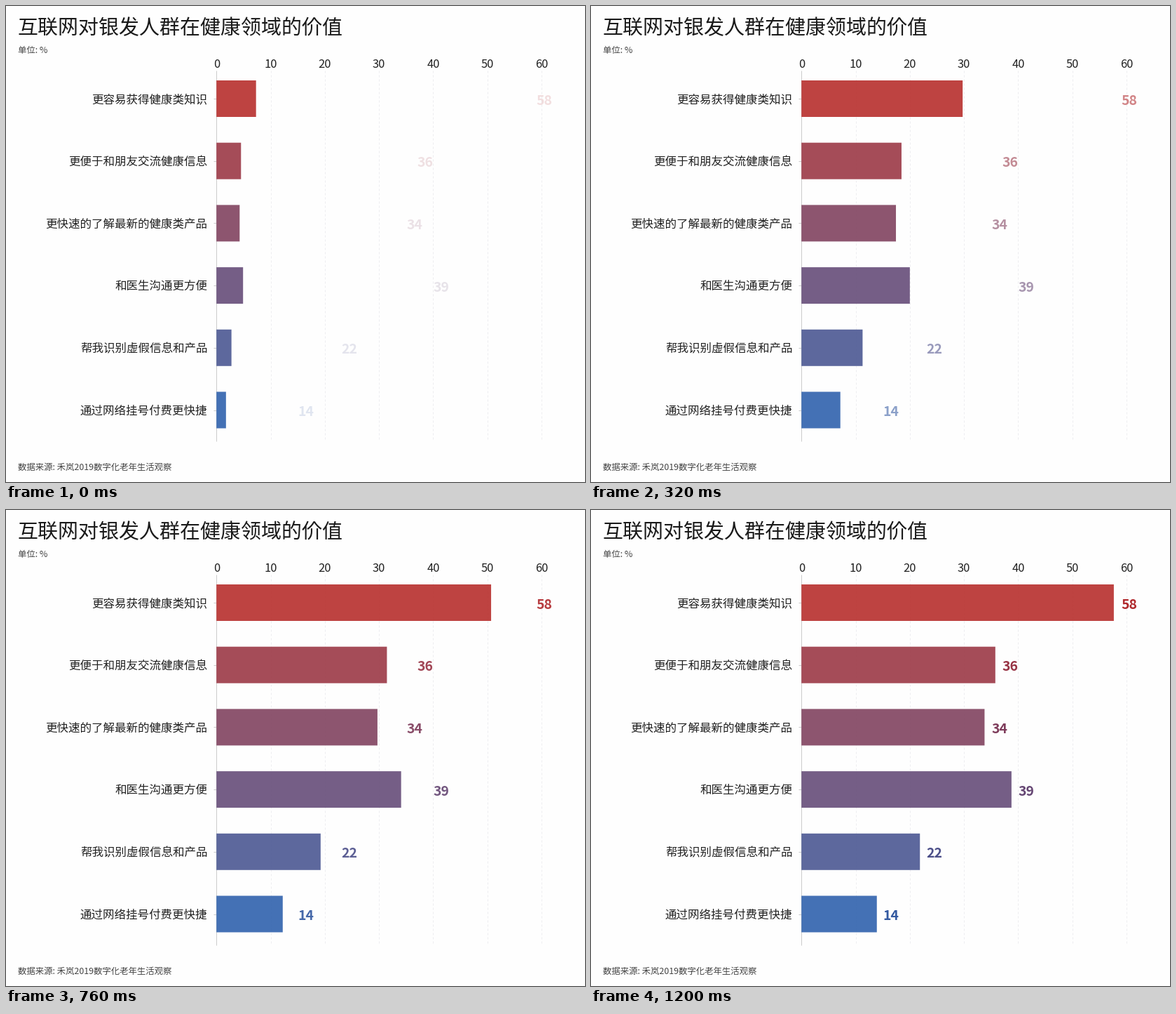
These frames come from a looping animation (826x678 px, 3200 ms). A matplotlib script:

```python
import numpy as np
import matplotlib.pyplot as plt
from matplotlib.animation import FuncAnimation
from matplotlib.patches import Rectangle

W, H, DPI = 826, 678, 64
FRAMES, INTERVAL = 80, 40
GROW_END = 1200
X0, UNIT = 300.2, 7.73
TOP, BOTTOM, BAND, BAR_H = 92, 619.5, 88.7, 52

ROWS = [
    ("更容易获得健康类知识", 58),
    ("更便于和朋友交流健康信息", 36),
    ("更快速的了解最新的健康类产品", 34),
    ("和医生沟通更方便", 39),
    ("帮我识别虚假信息和产品", 22),
    ("通过网络挂号付费更快捷", 14),
]

# Ease-out growth, as a smooth curve through a few (ms, share) points
EASE_T = np.array([0, 160, 320, 480, 760, 920, 1200]) / GROW_END
EASE_V = [0.126, 0.344, 0.513, 0.660, 0.874, 0.935, 0.994]
EASE = np.polyfit(EASE_T, EASE_V, len(EASE_T) - 1)

plt.rcParams["font.family"] = "Noto Sans CJK JP"
fig = plt.figure(figsize=(W / DPI, H / DPI), dpi=DPI, facecolor="#fefefe")
ax = fig.add_axes([0, 0, 1, 1])
ax.set_xlim(0, W)
ax.set_ylim(H, 0)
ax.axis("off")


def pt(px):
    return px * 72 / DPI


def label(x, y, text, size, ha="left", color="#222222", weight="light"):
    return ax.text(x, y, text, fontsize=pt(size), ha=ha, va="baseline",
                   color=color, weight=weight, zorder=5)


def line(xs, ys, color, **style):
    ax.plot(xs, ys, color=color, lw=pt(1), solid_capstyle="butt", zorder=1,
            **style)


def blend(first, last, share):
    return tuple((np.array(first) * (1 - share) + np.array(last) * share) / 255)


label(17, 40.5, "互联网对银发人群在健康领域的价值", 28.95, color="#1a1a1a")
label(17, 67.5, "单位: %", 12.4, color="#444444")
label(17, 661, "数据来源: 禾岚2019数字化老年生活观察", 12.4, color="#444444")

for value in range(0, 61, 10):
    x = X0 + value * UNIT
    label(x, 88.5, str(value), 16.5, ha="center")
    if value:
        line([x, x], [TOP, BOTTOM], "#ededf0", dashes=(3, 3))
line([X0, X0], [TOP, BOTTOM], "#cccccc")

bars, numbers = [], []
for i, (name, value) in enumerate(ROWS):
    y = 132 + i * BAND
    share = i / (len(ROWS) - 1)
    line([X0 - 4, X0], [y, y], "#cccccc")
    label(287.3, y + 6.2, name, 16.5, ha="right")
    bar = Rectangle((X0, y - BAR_H / 2), 0, BAR_H, lw=0, alpha=0.9, zorder=3,
                    facecolor=blend((183, 46, 44), (48, 98, 173), share),
                    snap=False)
    ax.add_patch(bar)
    bars.append(bar)
    numbers.append(label(X0 + value * UNIT + 8.2, y + 8.6, str(value), 19.3,
                         color=blend((176, 40, 44), (50, 88, 160), share),
                         weight="bold"))


def update(frame):
    t = min(frame * INTERVAL / GROW_END, 1)
    grown = float(np.clip(np.polyval(EASE, t), 0, 1))
    for bar, number, (_, value) in zip(bars, numbers, ROWS):
        bar.set_width(value * UNIT * grown)
        number.set_alpha(1 - (1 - grown) ** 1.15)
    return bars + numbers


anim = FuncAnimation(fig, update, frames=FRAMES, interval=INTERVAL,
                     init_func=lambda: update(0), repeat=True, repeat_delay=0)
plt.show()
```
